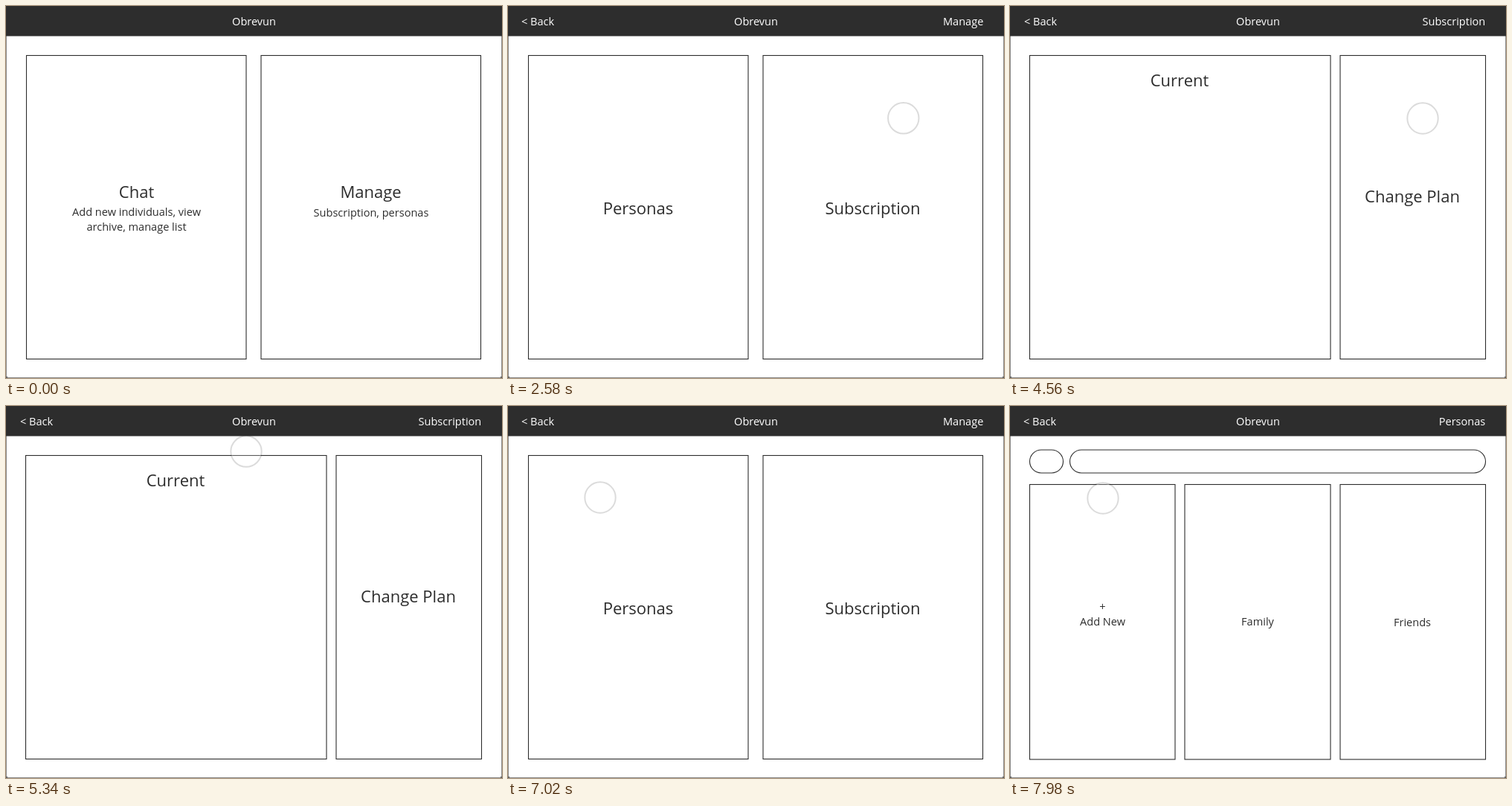
These frames come from a looping animation (667x500 px, 8000 ms). An HTML page:

```html
<!DOCTYPE html>
<html lang="en">
<head>
<meta charset="utf-8">
<title>App prototype</title>
<style>
  html, body { margin: 0; width: 100%; height: 100%; overflow: hidden; background: #555; }
  svg { display: block; width: 100%; height: 100%; }
  text { font-family: "Open Sans", "Noto Sans", sans-serif; font-size: 14.55px; fill: #2d2d2d; text-anchor: middle; }
  .big { font-size: 22px; }
  .bar text { fill: #fff; }
  .box { fill: #fff; stroke: #2d2d2d; stroke-width: 1.1; }
</style>
</head>
<body>
<svg viewBox="0 0 667 500">
  <rect x=".5" y=".5" width="666" height="499" rx="3" fill="#fff" stroke="#8c8c8c"/>
  <g class="bar">
    <rect width="667" height="40.5" fill="#2d2d2d"/>
    <text x="333.5" y="26">Obrevun</text>
    <text id="back" y="26" style="text-anchor:start">&lt; Back</text>
    <text id="title" style="text-anchor:end"></text>
  </g>
  <rect id="panel" class="box"/>
  <g id="screens"></g>
  <g id="touch">
    <circle r="20" fill="#fff" fill-opacity=".22" stroke="#fff" stroke-opacity=".4"/>
    <circle r="20.7" fill="none" stroke="#000" stroke-opacity=".14" stroke-width="2"/>
  </g>
</svg>
<script>
const LOOP = 8000, STEP = 60, MORPH = 450;
const $ = id => document.getElementById(id);

const box = (x1, y1, x2, y2, r = 0) =>
  `<rect class="box" x="${x1}" y="${y1}" width="${x2 - x1}" height="${y2 - y1}" rx="${r}"/>`;
const label = (x, y, s) => `<text x="${x}" y="${y}">${s}</text>`;
const heading = (x, y, s) => `<text class="big" x="${x}" y="${y}">${s}</text>`;

// panel: the left box shared by all screens, as x1, y1, x2, y2
const half = [27.5, 66.5, 323, 474.5];
const rightHalf = box(343, 66.5, 638.5, 474.5);
const screens = {
  home: {
    title: "", back: null, panel: half,
    body: rightHalf + heading(175.5, 258, "Chat") +
      label(175.5, 282, "Add new individuals, view") +
      label(175.5, 302, "archive, manage list") +
      heading(490.5, 258, "Manage") + label(491, 283, "Subscription, personas")
  },
  manage: {
    title: "Manage", back: 18, panel: half,
    body: rightHalf + heading(175, 279.7, "Personas") + heading(490.5, 279.7, "Subscription")
  },
  plan: {
    title: "Subscription", back: 19, panel: [26.5, 66.5, 431, 474.5],
    body: box(444, 66.5, 639.5, 474.5) + heading(228, 108, "Current") +
      heading(541, 264.3, "Change Plan")
  },
  personas: {
    title: "Personas", back: 18, panel: [26.5, 105.5, 222, 475],
    body: box(26.5, 59, 71.5, 90, 15.5) + box(80.5, 59, 639.5, 90, 15.5) +
      box(235, 105.5, 431, 475) + box(444, 105.5, 639.5, 475) +
      label(124.5, 275, "+") + label(124.5, 294.5, "Add New") +
      label(333, 294.5, "Family") + label(541, 295.5, "Friends")
  }
};
const flow = [[-1, "home"], [2320, "manage"], [4110, "plan"], [6060, "manage"], [7530, "personas"]];

// pointer path: time, x, y
const path = [
  [60, 496, 41], [840, 135, 278], [1320, 360, 21], [1620, 569, 118], [1740, 556, 140],
  [2520, 553, 147], [3000, 59, 235], [3480, 550, 150], [3600, 555, 151], [4680, 555, 151],
  [4980, 386, 69], [5160, 386, 69], [5820, 41, 25.5], [6120, 41, 25.5],
  [6840, 124, 123], [7020, 124, 123], [7980, 125, 124]
];

const mix = (a, b, k) => a + (b - a) * k;
const clamp = k => Math.min(1, Math.max(0, k));
const ease = k => k * k * (3 - 2 * k);

for (const name in screens) {
  $("screens").insertAdjacentHTML("beforeend", `<g id="${name}">${screens[name].body}</g>`);
}

function titleWidth(s) {
  $("title").textContent = s;
  return s ? $("title").getComputedTextLength() : 0;
}

function drawScreen(t) {
  const i = flow.findLastIndex(([start]) => t > start);
  const now = screens[flow[i][1]];
  const old = i ? screens[flow[i - 1][1]] : now;
  const k = ease(clamp((t - flow[i][0]) / MORPH));

  for (const name in screens) $(name).style.display = screens[name] === now ? "" : "none";

  const [x1, y1, x2, y2] = now.panel.map((v, j) => mix(old.panel[j], v, k));
  const attrs = { x: x1, y: y1, width: x2 - x1, height: y2 - y1 };
  for (const a in attrs) $("panel").setAttribute(a, attrs[a]);

  $("back").style.display = now.back === null ? "none" : "";
  $("back").setAttribute("x", mix(old.back ?? now.back ?? 0, now.back ?? 0, k));

  // a new title starts stretched to the width of the old one
  const oldWidth = titleWidth(old.title), width = titleWidth(now.title);
  const stretch = oldWidth && width ? mix(oldWidth / width, 1, k) : 1;
  $("title").setAttribute("transform", `translate(639.3 26) scale(${stretch} 1)`);
}

function drawTouch(t) {
  $("touch").style.display = t < path[0][0] ? "none" : "";
  const i = Math.max(0, Math.min(path.length - 2, path.findLastIndex(p => t >= p[0])));
  const [a, b] = [path[i], path[i + 1]];
  const k = ease(clamp((t - a[0]) / (b[0] - a[0])));
  $("touch").setAttribute("transform", `translate(${mix(a[1], b[1], k)} ${mix(a[2], b[2], k)})`);
}

function draw(ms) {
  const t = Math.floor((ms % LOOP) / STEP) * STEP;
  drawScreen(t);
  drawTouch(t);
}

const start = performance.now();
function tick() {
  draw(performance.now() - start);
  requestAnimationFrame(tick);
}
tick();
</script>
</body>
</html>
```
